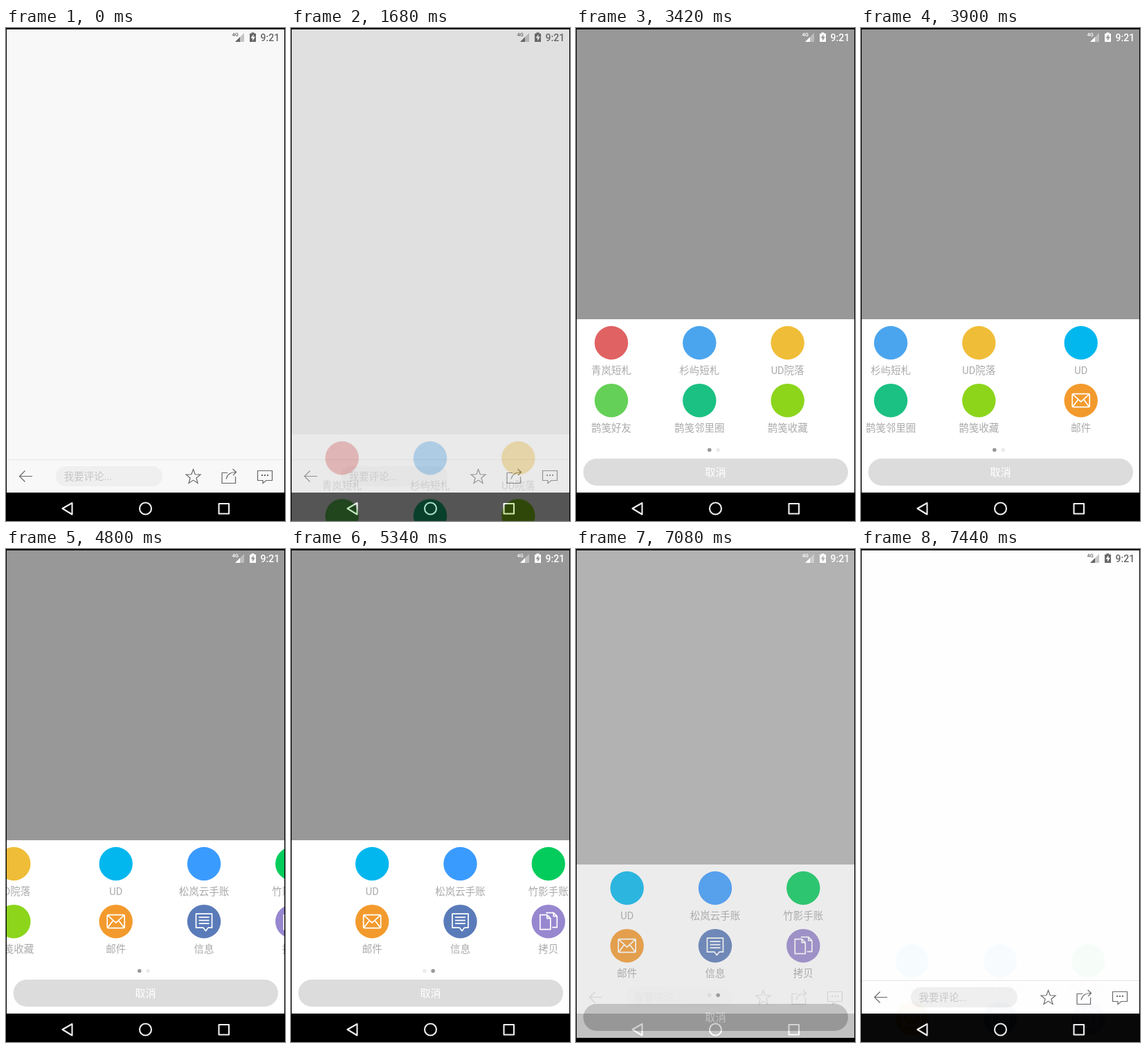
Write an HTML page that moves like this. It is 403 px wide and 711 px high and loops after 7680 ms.

```html
<!DOCTYPE html>
<html lang="zh-CN">
<head>
<meta charset="utf-8">
<title>Share sheet</title>
<style>
html, body { margin: 0; width: 100%; height: 100%; overflow: hidden; background: #000; }
svg { display: block; font-family: Roboto, "Noto Sans CJK SC", "Noto Sans CJK", sans-serif; }
.line { fill: none; stroke: #666; stroke-width: 1.2; }
.nav { fill: none; stroke: #f0f0f0; stroke-width: 2.1; stroke-linejoin: round; }
.glyph { fill: none; stroke: #fff; stroke-width: 1.7; stroke-linejoin: round; }
.label { fill: #aaa; font-size: 14.5px; text-anchor: middle; }
</style>
</head>
<body>
<svg width="403" height="711" viewBox="0 0 403 711">
  <clipPath id="screen"><rect x="1" y="2" width="401" height="709"/></clipPath>
  <rect width="403" height="711"/>
  <rect id="page" x="1" y="2" width="401" height="668"/>
  <path d="M1 622.5H402" stroke="#e6e6e6"/>
  <rect x="72" y="632" width="154" height="29" rx="14.5" fill="#efefef"/>
  <text x="83.5" y="652" font-size="14.5" fill="#c6c6c6">我要评论...</text>
  <g class="line">
    <path d="M38 646.5H19.5M27.5 638.5L19.5 646.5L27.5 654.5"/>
    <path id="star"/>
    <path d="M320 641.5H312V656.5H331.5V647M318 650.5Q320 640.5 332 640.5M327.5 636L332.5 640.5L328 645"/>
    <path d="M363.5 638.5H384.5V652.5H376L371 656.5V652.5H363.5Z"/>
    <path d="M369 645H371M373 645H375M377 645H379" stroke-width="1.8"/>
  </g>
  <rect id="dim" x="1" y="2" width="401" height="668"/>
  <g id="status">
    <text x="326.5" y="12" font-size="7.5" font-weight="500">4G</text>
    <path d="M331 20L344 7V20Z" opacity=".35"/>
    <path d="M331 20L338 13V20Z"/>
    <path fill-rule="evenodd" d="M352 8H354.500V6.500H358.500V8H361V20H352ZM357.500 9L353.500 14.500H356V18.500L360 12.800H357.500Z"/>
    <text x="367.500" y="18.500" font-size="14" font-weight="500">9:21</text>
  </g>
  <g class="nav">
    <path d="M81.500 693L95.500 685V701.500Z"/>
    <circle cx="201.500" cy="693" r="8.500"/>
    <rect x="307.500" y="686" width="14.500" height="14.500"/>
  </g>
  <g clip-path="url(#screen)">
    <g id="sheet">
      <rect x="1" y="420" width="401" height="250" fill="#fff"/>
      <g id="pager"></g>
      <circle class="dot" cx="192.800" cy="608.500" r="2.800"/>
      <circle class="dot" cx="205.200" cy="608.500" r="2.800"/>
      <rect id="cancel" x="10.500" y="621" width="382.500" height="39" rx="19.500"/>
      <text x="201.500" y="646" font-size="15.300" fill="#fff" text-anchor="middle">取消</text>
    </g>
  </g>
</svg>
<script>
const LOOP = 7680, STEP = 60, PAGE = 402;
const $ = id => document.getElementById(id);
const clamp = v => Math.min(1, Math.max(0, v));
const ramp = (t, from, to) => clamp((t - from) / (to - from));
const mix = (a, b, p) => a + (b - a) * p;
const gray = v => `rgb(${v},${v},${v})`;

const mail = 'M-11-9.500H11Q12.500-9.500 12.500-8V8Q12.500 9.500 11 9.500H-11Q-12.500 9.500-12.500 8V-8Q-12.500-9.500-11-9.500ZM-12-9L0 2L12-9M-12 9L-4-1.500M12 9L4-1.500';
const message = 'M-11.500-11H11.500V9H6L2.500 13.500L-1 9H-11.500ZM-7.500-6H7.500M-7.500-1.500H7.500M-7.500 3H7.500';
const copy = 'M-12-9.500H-2L3-4.500V11.500H-12ZM-2-9.500V-4.500H3M-3.500-12.500H7.500L12.500-7.500V8.500H5.500M7.500-12.500V-7.500H12.500';

// Each page: three columns, two rows.
const items = [
  ['青岚短札', '#e06262'], ['杉屿短札', '#4ba5ee'], ['UD院落', '#f0bd38'],
  ['鹊笺好友', '#65d057'], ['鹊笺邻里圈', '#1bc182'], ['鹊笺收藏', '#8cd51b'],
  ['UD', '#02b7ee'], ['松岚云手账', '#3a9bff'], ['竹影手账', '#04cc5c'],
  ['邮件', '#f39a2d', mail], ['信息', '#5a7bb9', message], ['拷贝', '#9787cf', copy]
];
$('pager').innerHTML = items.map(([name, color, glyph], i) => {
  const x = 73.7 + i % 3 * 127.3 + (i > 5 ? PAGE : 0);
  const y = 454 + Math.floor(i % 6 / 3) * 83.2;
  return `<g transform="translate(${x} ${y})"><circle r="24.2" fill="${color}"/>` +
    (glyph ? `<path class="glyph" d="${glyph}"/>` : '') +
    `<text class="label" y="45">${name}</text></g>`;
}).join('');

$('star').setAttribute('d', 'M' + Array.from({ length: 10 }, (_, i) => {
  const r = i % 2 ? 4.6 : 11, a = i * Math.PI / 5;
  return `${270.5 + r * Math.sin(a)} ${647.5 - r * Math.cos(a)}`;
}).join('L') + 'Z');

// Slow drag with a pause, then release and settle.
const drag = [[3300, 0], [3480, 34], [3900, 158], [4200, 250], [4440, 306], [4620, 306], [4800, 317], [5310, 345]];
function scrollAt(t) {
  if (t >= 5310) return mix(PAGE, 345, (1 - ramp(t, 5310, 5880)) ** 5);
  const i = drag.findIndex(([time]) => t < time);
  if (i < 1) return 0;
  const [t0, x0] = drag[i - 1], [t1, x1] = drag[i];
  return mix(x0, x1, ramp(t, t0, t1));
}

function draw(t) {
  const opened = t < 1680 ? 0 : ramp(t, 1613, 1813);
  const closed = ramp(t, 6960, 7440);
  const dim = t < 1680 ? 0 : ramp(t, 1620, 1860);
  const statusLight = ramp(t, 2040, 2220) * (1 - ramp(t, 7200, 7440));

  $('page').setAttribute('fill', gray(mix(248, 254, closed)));
  $('dim').setAttribute('opacity', 0.388 * dim * (1 - closed));
  $('status').setAttribute('fill', gray(mix(102, 255, statusLight)));
  $('sheet').setAttribute('opacity', opened * mix(1, 0.035, closed));
  $('sheet').setAttribute('transform', `translate(0 ${250 * (1 - opened) + 140 * closed})`);
  $('pager').setAttribute('transform', `translate(${-scrollAt(t)} 0)`);
  $('cancel').setAttribute('fill', t >= 6840 ? '#c8c8c8' : '#dcdcdc');
  const page = t >= 5340 ? 1 : 0;
  document.querySelectorAll('.dot').forEach((dot, i) =>
    dot.setAttribute('fill', i === page ? '#999' : '#ebebeb'));
}

function tick() {
  draw(Math.floor(performance.now() % LOOP / STEP) * STEP);
  requestAnimationFrame(tick);
}
tick();
</script>
</body>
</html>
```
